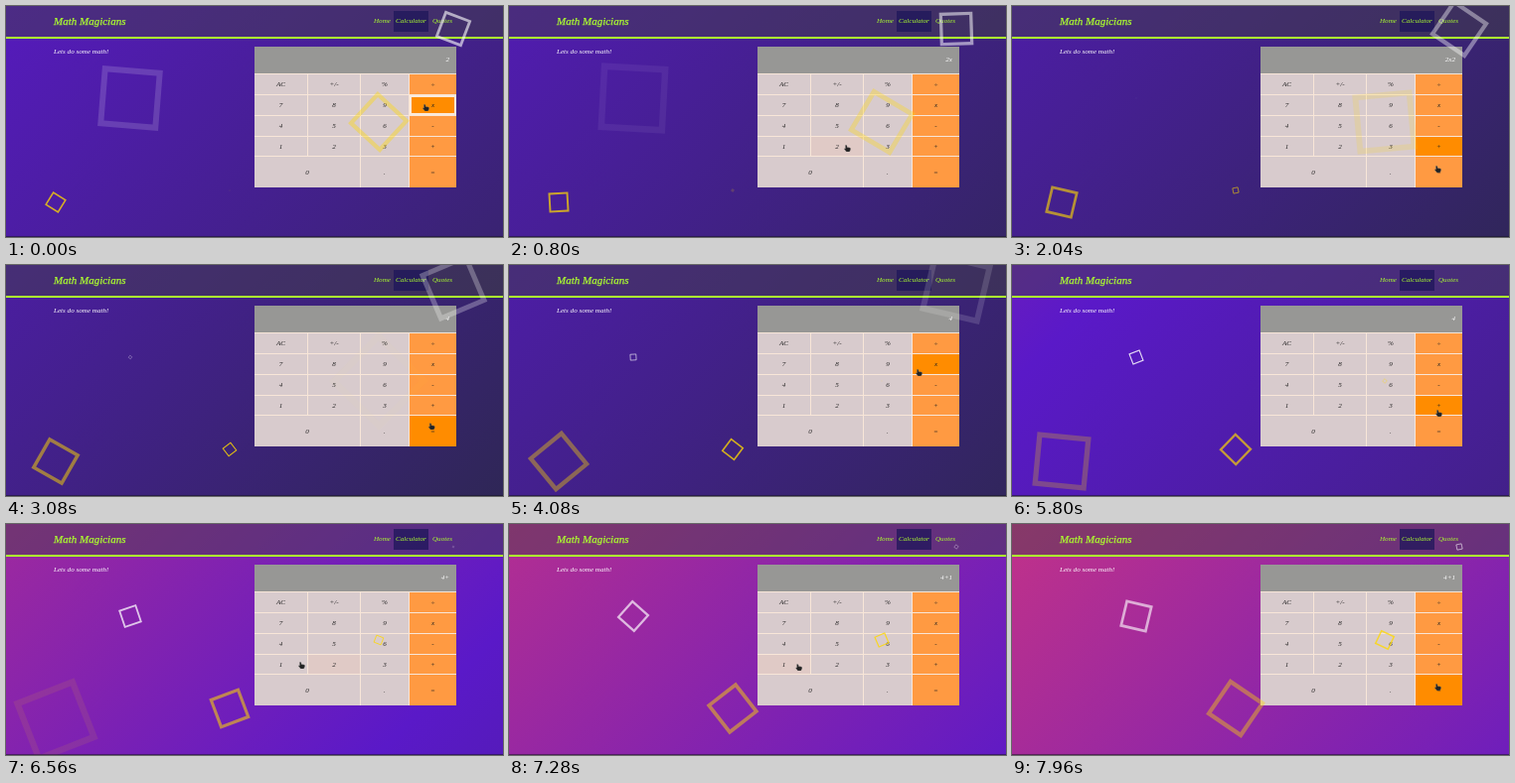
Animation of 500 by 233 pixels, one loop 8000 ms. Source, as an HTML page:

```html
<!DOCTYPE html>
<html lang="en">
<head>
<meta charset="utf-8">
<title>Calculator</title>
<style>
  html, body { margin: 0; width: 100%; height: 100%; overflow: hidden; }
  body {
    position: relative;
    font: italic 7.1px "Liberation Serif", serif;
    background: linear-gradient(-45deg, #212b32, #5a19c8, #ff4163) 0 50% / 400% 400%;
  }
  body::after {
    content: ""; position: absolute; left: 0; right: 0; bottom: 0; height: 1px;
    background: rgba(20, 20, 30, .5);
  }
  header {
    position: absolute; left: 0; top: 0; width: 100%; height: 31px;
    background: rgba(64, 64, 64, .45); border-bottom: 2px solid #adff2f; color: #adff2f;
  }
  header > *, p { position: absolute; margin: 0; white-space: nowrap; line-height: 20px; }
  h1 { left: 48px; top: 5px; font-size: 11px; font-weight: 400; -webkit-text-stroke: .25px; }
  nav span { position: absolute; top: 5px; line-height: 20px; }
  nav .current {
    left: 390px; width: 33px; height: 21px; padding-left: 2px;
    background: rgba(30, 22, 90, .75);
  }
  p { left: 48px; top: 36px; color: #fff; }
  #calculator {
    position: absolute; left: 250px; top: 41px; width: 203px; height: 142px;
    display: grid; gap: 1px; background: #f8e6d8;
    grid-template: 27px 20px 20px 20px 19px 31px / 53px 52px 48px 47px;
  }
  #display {
    grid-column: 1 / -1; background: #979795; color: #fff;
    text-align: right; padding-right: 7px; line-height: 27px;
  }
  .key {
    display: flex; align-items: center; justify-content: center;
    background: #d8cbcd; color: #222;
  }
  .key.hover { background: #e0cac6; }
  .key.operator { background: #ff9a42; }
  .key.operator.hover { background: #ff8c00; }
  .key.pressed { box-shadow: inset 0 0 0 2px #fbeadb; }
  .zero { grid-column: span 2; }
  .cube {
    position: absolute; box-sizing: border-box; width: 72px; height: 72px;
    margin: -36px 0 0 -36px; border: 7px solid #ffd900;
  }
  .cube.light { border-color: #fff; }
  #cursor { position: absolute; left: -3px; top: -3px; width: 7px; height: 7px; }
</style>
</head>
<body>
<header>
  <h1>Math Magicians</h1>
  <nav>
    <span style="left:370px">Home</span>
    <span class="current">Calculator</span>
    <span style="left:429px">Quotes</span>
  </nav>
</header>
<p>Lets do some math!</p>
<div id="calculator"><div id="display"></div></div>
<svg id="cursor" viewBox="0 0 14 14">
  <path d="M3 1Q5 0 6 2V5L12 6Q14 7 13 10L11 14H5L1 9Q0 7 3 8Z" fill="#222" stroke="#777" stroke-width=".7"/>
</svg>
<script>
const LOOP = 8000;
const $ = id => document.getElementById(id);

const CLOCK = [[0, .87], [800, 1.57], [2040, 2.79], [4080, 4.94], [4120, 4.98],
  [4240, 4.98], [5800, 6.13], [6560, 7.38], [8000, 8.83]];
const POINTER = [[0, 422, 102], [150, 422, 102], [700, 340, 143], [1300, 340, 143],
  [1950, 428, 164], [3000, 428, 164], [3600, 424, 128], [4080, 412, 108],
  [4700, 429, 149], [6050, 429, 149], [6560, 297, 142], [6800, 284, 143],
  [7200, 284, 143], [7800, 428, 164], [8000, 428, 164]];
const DISPLAY = [[0, "2"], [140, "2x"], [1150, "2x2"], [2600, "4"], [5950, "4+"], [7100, "4+1"]];
const HOVERS = [["x", 0, 240], ["2", 520, 1400], ["+", 1760, 2100], ["=", 2100, 3200],
  ["+", 3300, 3700], ["-", 3700, 3950], ["x", 3950, 4300], ["-", 4300, 4520],
  ["+", 4520, 6200], ["3", 6200, 6380], ["2", 6380, 6640], ["1", 6640, 7320],
  ["2", 7320, 7460], ["3", 7460, 7600], ["=", 7700, 8001]];
const CUBES = [[45, 80, 0], [25, 40, 10, "light"], [75, 50, 8], [90, 10, 6, "light"], [10, 85, 4]];

const mix = (a, b, k) => a + (b - a) * k;
const smooth = k => k * k * (3 - 2 * k);

function sample(track, time, ease = k => k) {
  const next = Math.max(1, track.findIndex(point => point[0] > time));
  const [a, b] = [track[next - 1], track[next]];
  const k = ease((time - a[0]) / (b[0] - a[0]));
  return a.slice(1).map((value, i) => mix(value, b[i + 1], k));
}

function bezier(x1, y1, x2, y2) {
  const curve = (s, p, q) => 3 * s * (1 - s) * ((1 - s) * p + s * q) + s ** 3;
  return x => {
    let low = 0, high = 1;
    for (let i = 0; i < 24; i++) {
      const mid = (low + high) / 2;
      if (curve(mid, x1, x2) < x) low = mid; else high = mid;
    }
    return curve(low, y1, y2);
  };
}
const easeIn = bezier(.42, 0, 1, 1);
const ease = bezier(.25, .1, .25, 1);

function add(parent, className, text = "") {
  const element = document.createElement("div");
  element.className = className;
  element.textContent = text;
  parent.append(element);
  return element;
}

const keys = {};
for (const label of "AC +/- % ÷ 7 8 9 x 4 5 6 - 1 2 3 + 0 . =".split(" ")) {
  const kind = "÷x-+=".includes(label) ? " operator" : label === "0" ? " zero" : "";
  keys[label] = add($("calculator"), "key" + kind, label);
}

const cubes = CUBES.map(([left, top, age, kind = ""]) => {
  const element = add(document.body, "cube " + kind);
  element.style.left = left + "%";
  element.style.top = top + "%";
  return { element, age };
});
document.body.append($("cursor"));

function draw() {
  const time = performance.now() % LOOP;
  const [clock] = sample(CLOCK, time);

  for (const { element, age } of cubes) {
    const k = easeIn((clock + age) % 12 / 12);
    element.style.transform = `rotate(${960 * k}deg) scale(${k})`;
    element.style.opacity = 1 - k;
  }

  const phase = (clock + 3) % 15 / 7.5;
  const shift = phase < 1 ? ease(phase) : 1 - ease(phase - 1);
  document.body.style.backgroundPosition = `${100 * shift}% 50%`;

  const [x, y] = sample(POINTER, time, smooth);
  $("cursor").style.transform = `translate(${x}px, ${y}px)`;

  const text = DISPLAY.filter(([start]) => start <= time).pop()[1];
  if ($("display").textContent !== text) $("display").textContent = text;

  const hovered = HOVERS.find(([, start, end]) => time >= start && time < end);
  for (const label in keys) {
    keys[label].classList.toggle("hover", !!hovered && hovered[0] === label);
  }
  keys.x.classList.toggle("pressed", time < 140);
  requestAnimationFrame(draw);
}
draw();
</script>
</body>
</html>
```
